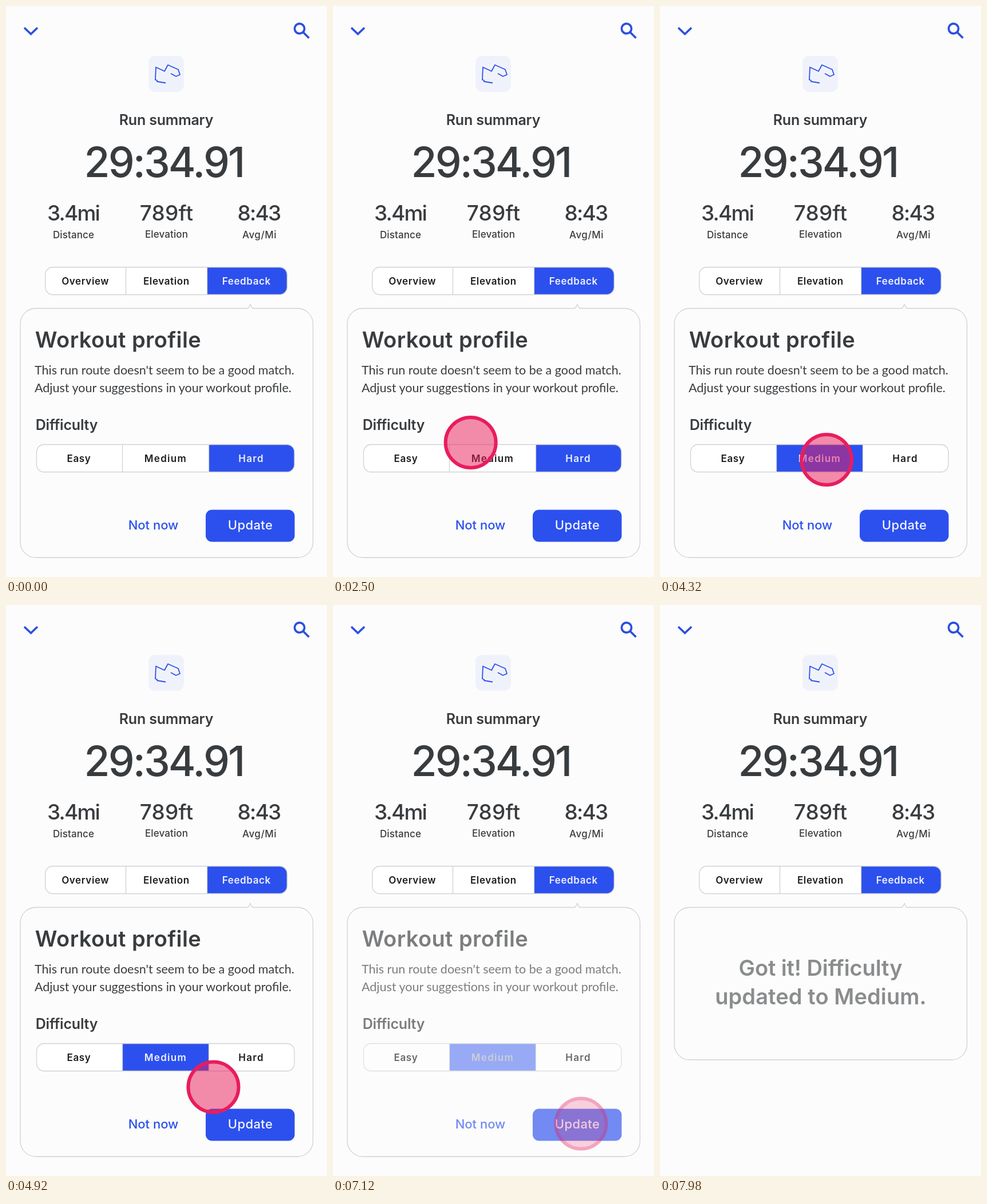
An HTML page that plays this animation: 561x998 px, repeating every 8 s.

```html
<!DOCTYPE html>
<html lang="en">
<head>
<meta charset="utf-8">
<title>Run summary</title>
<style>
  html, body { margin: 0; width: 100%; height: 100%; overflow: hidden; background: #fcfcfc; }
  svg { display: block; width: 100vw; height: 100vh; }
  text { font: 500 17px Inter, Roboto, sans-serif; text-anchor: middle; }
  .dark { fill: #393c3f; }
  .time { font-size: 73px; letter-spacing: -2.9px; }
  .stat { font-size: 37px; letter-spacing: -1.8px; }
  .head { font-size: 38px; font-weight: 600; }
  .sub { font-size: 25px; font-weight: 600; letter-spacing: -.2px; }
  .body { font: 400 21.5px Lato, "Open Sans", sans-serif; text-anchor: start; }
  .seg { font-weight: 600; letter-spacing: .6px; }
  .wide { letter-spacing: 1.3px; }
  .action { font-size: 22px; }
  .line { fill: none; stroke: #d0d2d7; stroke-width: 1.3; }
  .icon { fill: none; stroke: #2c4fe0; stroke-width: 3.7; }
  .blue { fill: #2c50ee; }
</style>
</head>
<body>
<svg viewBox="0 0 561 998">
  <defs>
    <clipPath id="frame"><rect x="53.5" y="766.5" width="450.5" height="48" rx="13"/></clipPath>
    <clipPath id="slideClip"><rect id="slideMask" y="766" width="150" height="49"/></clipPath>
    <clipPath id="buttonClip"><rect x="349" y="880.5" width="155.5" height="56" rx="11"/></clipPath>
    <g id="levels">
      <text class="seg" x="127.5" y="797">Easy</text>
      <text class="seg wide" x="279" y="797">Medium</text>
      <text class="seg wide" x="428.5" y="797">Hard</text>
    </g>
  </defs>

  <path class="icon" d="M32 38l11.5 11L55 38"/>
  <g class="icon"><circle cx="513" cy="39.5" r="8.6"/><path d="M519 45.5l10.5 10.5"/></g>
  <rect x="249" y="87" width="62" height="63" rx="12" fill="#f0f2fb"/>
  <path d="M288 118l9 5 7-3-3-9-18-8-6 11-15-7-1 22 3 1v2l15 2.5" fill="none" stroke="#2c50ee" stroke-width="1.8" stroke-linejoin="round"/>

  <g class="dark">
    <text class="sub" x="280" y="208">Run summary</text>
    <text class="time" x="276" y="299">29:34.91</text>
    <text class="stat" x="117.5" y="375">3.4mi</text>
    <text class="stat" x="280.5" y="375" style="letter-spacing:.2px">789ft</text>
    <text class="stat" x="442" y="375">8:43</text>
    <text x="118" y="405.5" letter-spacing=".1">Distance</text>
    <text x="280.5" y="404.5" letter-spacing=".1">Elevation</text>
    <text x="443" y="405.5" letter-spacing=".5">Avg/Mi</text>
  </g>

  <rect x="68.7" y="456.5" width="422.6" height="48" rx="13" fill="#fff"/>
  <path class="blue" d="M352 457h126.500a12.500 12.500 0 0 1 12.500 12.500v22a12.500 12.500 0 0 1-12.500 12.500H352z"/>
  <rect class="line" x="68.7" y="456.5" width="422.6" height="48" rx="13"/>
  <path class="line" d="M209.500 457v47M351.500 457v47"/>
  <g fill="#1c1d20">
    <text class="seg" x="138.7" y="487">Overview</text>
    <text class="seg" x="280.3" y="487">Elevation</text>
    <text class="seg" x="420.3" y="487" fill="#eef1ff">Feedback</text>
  </g>

  <path class="line" id="card"/>

  <g id="form">
    <g class="dark">
      <text class="head" x="196" y="597" letter-spacing=".4">Workout profile</text>
      <text class="body" x="50" y="643.5">This run route doesn't seem to be a good match.</text>
      <text class="body" x="50" y="675">Adjust your suggestions in your workout profile.</text>
      <text class="sub" x="106" y="741">Difficulty</text>
    </g>
    <rect x="53.5" y="766.5" width="450.5" height="48" rx="13" fill="#fff"/>
    <use href="#levels" fill="#1c1d20"/>
    <g id="slider" clip-path="url(#frame)">
      <rect class="blue" id="slide" y="766" width="150" height="49"/>
      <g clip-path="url(#slideClip)"><use href="#levels" fill="#eef1ff"/></g>
    </g>
    <rect class="line" x="53.5" y="766.5" width="450.5" height="48" rx="13"/>
    <path class="line" d="M203.500 767v47M354.500 767v47"/>
    <text class="action" x="257.5" y="915" fill="#2c50ee">Not now</text>
    <g clip-path="url(#buttonClip)">
      <rect class="blue" x="349" y="880" width="156" height="57"/>
      <text class="action" x="427" y="915" fill="#f4f6ff" letter-spacing=".4">Update</text>
      <circle id="ripple" cx="428" cy="908" fill="#fff"/>
    </g>
  </g>

  <g class="dark" id="done">
    <text class="head" x="280.5" y="648" letter-spacing="-.1">Got it! Difficulty</text>
    <text class="head" x="281" y="698" letter-spacing=".1">updated to Medium.</text>
  </g>

  <circle id="dot" r="44" fill="#ea1c5b" fill-opacity=".5" stroke="#e81d5e" stroke-width="6"/>
</svg>
<script>
const LOOP = 8000;
const el = id => document.getElementById(id);
const set = (id, attrs) => {
  for (const name in attrs) el(id).setAttribute(name, attrs[name]);
};
const ramp = (t, from, to) => Math.min(1, Math.max(0, (t - from) / (to - from)));
const ease = p => (1 - Math.cos(Math.PI * p)) / 2;
const mix = (a, b, p) => a + (b - a) * p;
const press = (t, at) => ease(ramp(t, at - 220, at)) - ease(ramp(t, at, at + 220));

function cardPath(bottom) {
  return `M52 528.500H421q3 0 4-3l2-4 2 4q1 3 4 3H509.500a27 27 0 0 1 27 27V${bottom - 27}` +
    `a27 27 0 0 1-27 27H52a27 27 0 0 1-27-27V555.500a27 27 0 0 1 27-27z`;
}

function draw(t) {
  // Pointer: glide to the selector, then arc to the button
  const first = ease(ramp(t, 2000, 3000));
  const second = ease(ramp(t, 4420, 5420));
  const x = mix(mix(190, 291, first), 433.5, second);
  const y = mix(mix(733, 793, first), 906.5, second) - 30 * second * (1 - second);
  const scale = 1 - .21 * (press(t, 3620) + press(t, 6040));
  set('dot', {
    transform: `translate(${x} ${y}) scale(${scale})`,
    opacity: ramp(t, 1700, 2000) * (1 - ramp(t, 6840, 7300))
  });

  const slideX = mix(354.5, 204, ease(ramp(t, 3400, 3755)));
  set('slide', { x: slideX });
  set('slideMask', { x: slideX });

  const wave = ramp(t, 5970, 6500);
  set('ripple', { r: 76 * wave, opacity: wave ? .3 * (1 - wave) : 0 });

  const fade = ramp(t, 6930, 7490);
  set('form', { opacity: 1 - fade });
  set('slider', { opacity: 1 - .8 * fade });

  set('card', { d: cardPath(mix(964, 795, ease(ramp(t, 7460, 7940)))) });
  set('done', { opacity: .58 * ramp(t, 7720, 7980) });
}

function tick() {
  draw(performance.now() % LOOP);
  requestAnimationFrame(tick);
}
tick();
</script>
</body>
</html>
```
